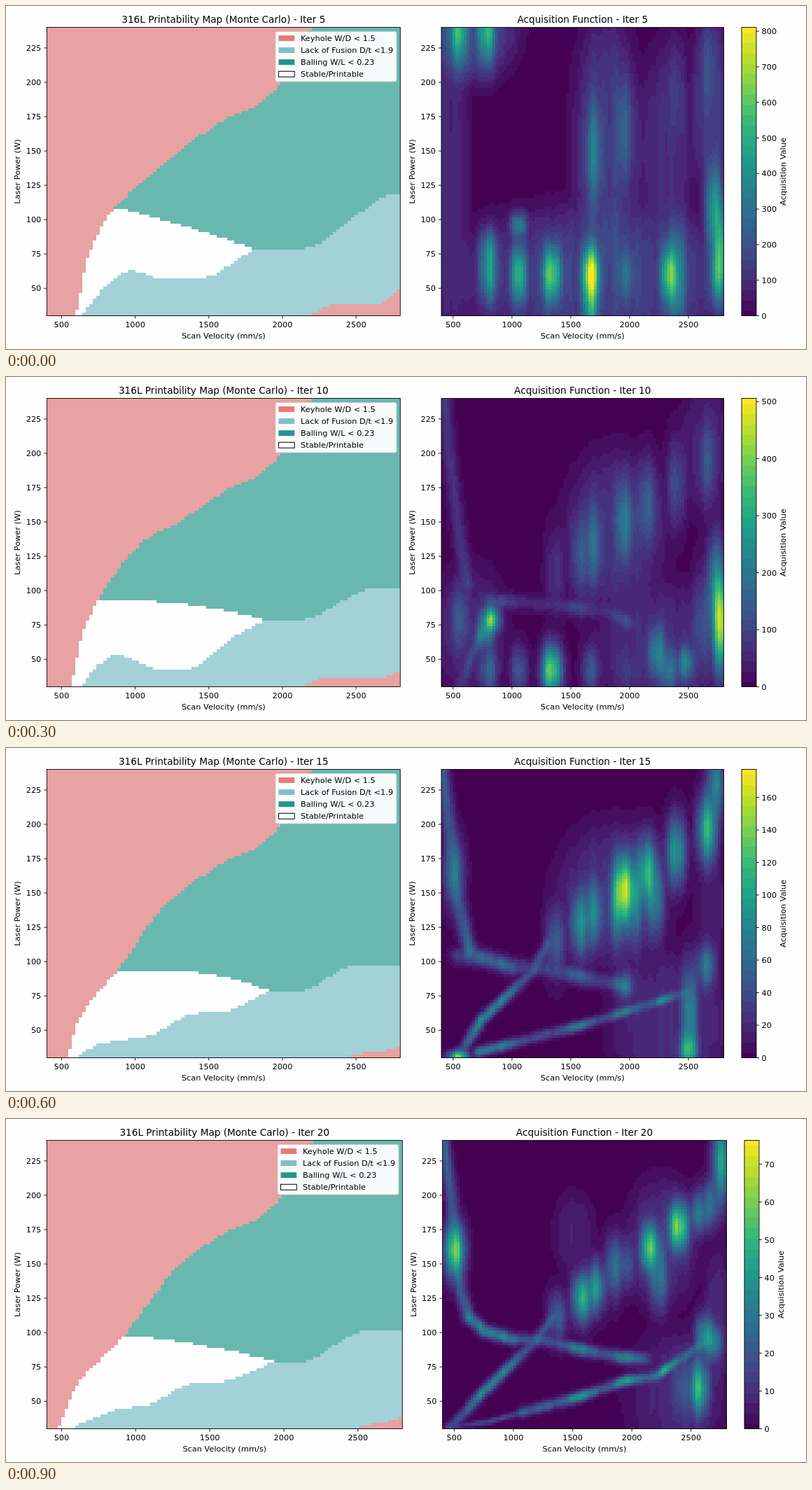
An HTML page with a canvas that plays this animation: 1143 by 490 pixels, repeating every 1200 ms.

```html
<!DOCTYPE html>
<html lang="en">
<head>
<meta charset="utf-8">
<title>Printability map and acquisition function</title>
<style>
html, body { margin: 0; width: 100%; height: 100%; overflow: hidden; background: #fefefe; }
canvas { display: block; }
</style>
</head>
<body>
<canvas id="stage" width="1143" height="490"></canvas>
<script>
const W = 1143, H = 490, TOP = 30.5, BOTTOM = 442.5, CELLS = 100, HOLD = 300, LEVELS = 28;
const V0 = 400, V1 = 2800, P0 = 30, P1 = 240;   // velocity and power ranges
const RED = '#e8a2a2', BLUE = '#a2d1d8', TEAL = '#69b8b0', WHITE = '#fefefe';
const VIRIDIS = ['440154', '482878', '3e4a89', '31688e', '26828e', '1f9e89', '35b779', '6ece58', 'b5de2b', 'fde725']
  .map(h => [0, 2, 4].map(i => parseInt(h.slice(i, i + 2), 16)));
const FONT = '"DejaVu Sans", sans-serif';

// Upper part of the keyhole limit, and the velocities where heat gathers.
const KEYHOLE_TOP = [[1300, 150], [1600, 172], [1880, 187], [2000, 202], [2200, 240]];
const HIGH = [1370, 1580, 1700, 1960, 2155, 2395, 2660];
const LOW = [800, 1060, 1340, 1670, 1970, 2340, 2760];
const BEADS = [740, 930, 1560, 1960, 2280];
const SPOT = 58;   // horizontal spread of a hot spot
const pages = [];

const clamp = t => Math.max(0, Math.min(1, t));
const smooth = t => (t = clamp(t), t * t * (3 - 2 * t));
const bell = d => Math.exp(-d * d / 2);

function viridis(value) {
  const p = Math.round(clamp(value) * LEVELS) / LEVELS * 9, i = Math.min(8, Math.floor(p));
  return `rgb(${VIRIDIS[i].map((c, k) => Math.round(c + (VIRIDIS[i + 1][k] - c) * (p - i)))})`;
}

// Smooth curve through key points that never overshoots them.
function curve(keys) {
  const slope = keys.slice(1).map(([x, y], i) => (y - keys[i][1]) / (x - keys[i][0]));
  const tangent = keys.map((_, i) => {
    const a = slope[i - 1] ?? slope[i], b = slope[i] ?? a;
    return a * b > 0 ? 2 * a * b / (a + b) : 0;
  });
  return v => {
    if (v <= keys[0][0]) return keys[0][1];
    const i = keys.findIndex(k => k[0] > v) - 1;
    if (i < 0) return keys[keys.length - 1][1];
    const [x, y] = keys[i], w = keys[i + 1][0] - x, t = (v - x) / w, s = smooth(t);
    return y + s * (keys[i + 1][1] - y)
      + w * t * (1 - t) * (tangent[i] * (1 - t) - tangent[i + 1] * t);
  };
}

function regionMap({ keyhole, fusion, balling, corner }) {
  const keyholeAt = curve([...keyhole, ...KEYHOLE_TOP]), fusionAt = curve(fusion);
  const { from, height, meet, bend, rise, end } = balling;
  const ballingAt = v => v < meet
    ? 79 + (height - 79) * (1 - clamp((v - from) / (meet - from)) ** bend)
    : 79 + rise * smooth((v - 2120) / (end - 2120));
  const cornerAt = v => 30 + corner.rise * smooth((v - corner.from) / 240) + corner.tail * smooth((v - 2650) / 200);
  return (v, p) => {
    if (p > keyholeAt(v) || p < cornerAt(v)) return RED;
    if (p > ballingAt(v)) return TEAL;
    return v < meet && p > fusionAt(v) ? WHITE : BLUE;
  };
}

// Distance in pixels from a point to a path of key points.
function distance(path, v, p) {
  const kx = .168, ky = 1.96;
  let best = Infinity;
  for (let i = 1; i < path.length; i++) {
    const [a, b] = [path[i - 1], path[i]];
    const dx = (b[0] - a[0]) * kx, dy = (b[1] - a[1]) * ky, x = (v - a[0]) * kx, y = (p - a[1]) * ky;
    const t = clamp((x * dx + y * dy) / (dx * dx + dy * dy));
    best = Math.min(best, Math.hypot(x - t * dx, y - t * dy));
  }
  return best;
}

// Spots are [v, p, height, gain]; hazes are wide flat patches [v, p, width, height, gain].
function heatMap({ high, low = { gains: [] }, spots, hazes, ridges = [] }) {
  const all = [
    ...high.gains.map((g, i) => [HIGH[i], 118 + high.shift + .0635 * (HIGH[i] - HIGH[0]), high.tall, g]),
    ...low.gains.map((g, i) => [LOW[i], low.power, low.tall, g]),
    ...spots
  ];
  return (v, p) => {
    const bead = .8 + .8 * BEADS.reduce((sum, b) => sum + bell((v - b) / 60), 0);
    let sum = 0;
    for (const [sv, sp, tall, gain] of all) sum += (gain * bell((v - sv) / SPOT) * bell((p - sp) / tall)) ** 2;
    for (const [hv, hp, wide, tall, gain] of hazes) {
      const d = ((v - hv) / wide) ** 2 + ((p - hp) / tall) ** 2;
      sum += (gain * bell(d)) ** 2;
    }
    for (const { gain, width, path } of ridges) sum += (gain * bead * bell(distance(path, v, p) / width)) ** 2;
    return Math.sqrt(sum) * (1 + .15 * Math.sin(v / 21) * Math.sin(v / 57));
  };
}

function fillCells(g, x0, width, color) {
  const dx = width / CELLS, dy = (BOTTOM - TOP) / CELLS;
  for (let i = 0; i < CELLS; i++) {
    for (let j = 0; j < CELLS; j++) {
      const x = Math.round(x0 + i * dx), y = Math.round(TOP + j * dy);
      g.fillStyle = color(V0 + (V1 - V0) * (i + .5) / CELLS, P1 - (P1 - P0) * (j + .5) / CELLS);
      g.fillRect(x, y, Math.round(x0 + (i + 1) * dx) - x, Math.round(TOP + (j + 1) * dy) - y);
    }
  }
}

function text(g, str, x, y, align = 'center', size = 11.34) {
  g.font = `${size}px ${FONT}`;
  g.textAlign = align;
  g.fillStyle = '#000';
  g.fillText(str, x, y);
}

function upright(g, str, x, y) {
  g.save();
  g.translate(x, y);
  g.rotate(-Math.PI / 2);
  text(g, str, 0, 0);
  g.restore();
}

function line(g, x1, y1, x2, y2) {
  g.beginPath();
  g.moveTo(x1, y1);
  g.lineTo(x2, y2);
  g.stroke();
}

function axes(g, x0, width, title) {
  g.strokeStyle = '#000';
  g.lineWidth = .9;
  g.strokeRect(x0, TOP, width, BOTTOM - TOP);
  for (let v = 500; v <= 2500; v += 500) {
    const x = x0 + width * (v - V0) / (V1 - V0);
    line(g, x, BOTTOM, x, BOTTOM + 4);
    text(g, v, x, 459);
  }
  for (let p = 50; p <= 225; p += 25) {
    const y = BOTTOM - (BOTTOM - TOP) * (p - P0) / (P1 - P0);
    line(g, x0 - 4, y, x0, y);
    text(g, p, x0 - 8, y + 4.2, 'right');
  }
  text(g, 'Scan Velocity (mm/s)', x0 + width / 2, 475);
  upright(g, 'Laser Power (W)', x0 - 38, 236.5);
  text(g, title, x0 + width / 2, 24, 'center', 13.61);
}

function legend(g, x) {
  g.beginPath();
  g.roundRect(x, 36.5, 173, 71.5, 2.5);
  g.fillStyle = 'rgba(255,255,255,.95)';
  g.fill();
  g.strokeStyle = '#ccc';
  g.stroke();
  [['Keyhole W/D < 1.5', '#e57b7b'], ['Lack of Fusion D/t <1.9', '#7dc0ca'],
   ['Balling W/L < 0.23', '#25948e'], ['Stable/Printable', '#fff']].forEach(([label, color], i) => {
    const y = 42 + i * 17.1;
    g.fillStyle = color;
    g.fillRect(x + 4.5, y, 22.7, 8);
    g.strokeStyle = '#000';
    g.lineWidth = 1;
    if (i === 3) g.strokeRect(x + 4.5, y, 22.7, 8);
    text(g, label, x + 36, y + 8, 'left');
  });
}

function colorbar(g, x, max, step, labelX) {
  const height = BOTTOM - TOP;
  for (let y = Math.round(TOP); y < BOTTOM; y++) {
    g.fillStyle = viridis((BOTTOM - y) / height);
    g.fillRect(x, y, 21, 1);
  }
  g.strokeStyle = '#000';
  g.lineWidth = .9;
  g.strokeRect(x, TOP, 21, height);
  for (let v = 0; v <= max; v += step) {
    const y = BOTTOM - height * v / max;
    line(g, x + 21, y, x + 25, y);
    text(g, v, x + 28.5, y + 4.2, 'left');
  }
  upright(g, 'Acquisition Value', labelX, 236.5);
}

function addPage({ iter, max, step, map, heat, mapW = 505, heatX = 622, heatW = 403.5, barX = 1051, labelX = 1114 }) {
  const page = document.createElement('canvas');
  page.width = W;
  page.height = H;
  const g = page.getContext('2d');
  g.fillStyle = WHITE;
  g.fillRect(0, 0, W, H);
  fillCells(g, 58.3, mapW, regionMap(map));
  axes(g, 58.3, mapW, `316L Printability Map (Monte Carlo) - Iter ${iter}`);
  legend(g, 58.3 + mapW - 178.3);
  const heatAt = heatMap(heat);
  fillCells(g, heatX, heatW, (v, p) => viridis(heatAt(v, p)));
  axes(g, heatX, heatW, `Acquisition Function - Iter ${iter}`);
  colorbar(g, barX, max, step, labelX);
  pages.push(page);
}

addPage({
  iter: 5, max: 811, step: 100,
  map: {
    keyhole: [[595, 30], [690, 76], [860, 108], [1130, 134]],
    fusion: [[637, 30], [790, 50], [970, 63], [1160, 57.5], [1430, 57.5], [1820, 79]],
    balling: { from: 870, height: 108, meet: 1800, bend: 1.2, rise: 40, end: 2800 },
    corner: { from: 2140, rise: 8.5, tail: 13 }
  },
  heat: {
    high: { gains: [0, 0, .38, .3, 0, .17, .2], shift: 10, tall: 30 },
    low: { gains: [.5, .6, .8, .95, .35, .7, .5], power: 60, tall: 16 },
    spots: [[545, 238, 20, .7], [780, 238, 18, .65], [1060, 96, 7, .4], [800, 78, 12, .4],
      [1670, 36, 20, .5], [2400, 58, 30, .5], [2720, 108, 25, .5], [2790, 78, 26, .65]],
    hazes: [[1800, 58, 1080, 44, .18], [650, 240, 330, 34, .2], [1800, 150, 240, 85, .17],
      [490, 130, 130, 130, .1], [2300, 150, 200, 65, .12], [2700, 180, 150, 60, .16]]
  }
});

addPage({
  iter: 10, max: 505.7, step: 100,
  map: {
    keyhole: [[566, 30], [640, 68], [850, 110], [1070, 137]],
    fusion: [[635, 30], [750, 46], [875, 53], [1180, 42.5], [1350, 43], [1640, 64], [1870, 78]],
    balling: { from: 800, height: 93, meet: 1880, bend: 2.2, rise: 22, end: 2620 },
    corner: { from: 2080, rise: 6.5, tail: 5 }
  },
  heat: {
    high: { gains: [.15, .28, .33, .42, .3, .24, .26], shift: -5, tall: 23 },
    low: { gains: [.3, .25, .82, .25, .15, .35, .1], power: 42, tall: 13 },
    spots: [[2790, 77, 24, .95], [2740, 103, 26, .45], [2620, 77, 28, .25], [815, 79, 7, .7],
      [765, 69, 8, .42], [550, 79, 18, .28], [2230, 55, 15, .45], [2470, 47, 10, .42]],
    hazes: [[1880, 143, 360, 50, .14], [650, 70, 260, 42, .1], [2250, 58, 480, 42, .12], [2650, 205, 200, 45, .08]],
    ridges: [{ gain: .18, width: 7, path: [[430, 240], [475, 195], [555, 138], [610, 105]] },
      { gain: .17, width: 6, path: [[555, 30], [675, 57], [810, 79]] },
      { gain: .14, width: 8, path: [[805, 93], [1280, 90], [1800, 85], [2000, 77]] }]
  }
});

addPage({
  iter: 15, max: 177.2, step: 20,
  map: {
    keyhole: [[540, 30], [610, 57], [900, 96], [1110, 130]],
    fusion: [[600, 30], [760, 40], [1110, 47], [1390, 62], [1610, 64], [1910, 79]],
    balling: { from: 900, height: 94, meet: 1910, bend: 3, rise: 18, end: 2500 },
    corner: { from: 2390, rise: 4.5, tail: 4 }
  },
  heat: {
    high: { gains: [.3, .5, .42, .9, .65, .55, .66], shift: -3, tall: 18 },
    spots: [[510, 165, 18, .38], [1900, 145, 22, .5], [2040, 148, 24, .45], [2210, 145, 20, .42],
      [2740, 230, 20, .4], [545, 31, 3, .75], [1965, 83, 9, .3], [2500, 36, 9, .62], [2510, 60, 26, .42],
      [2650, 97, 12, .4]],
    hazes: [[1850, 148, 400, 45, .13], [2350, 55, 430, 45, .12], [2700, 140, 130, 50, .07]],
    ridges: [{ gain: .32, width: 7, path: [[410, 240], [470, 200], [520, 154], [600, 120], [640, 108]] },
      { gain: .22, width: 8, path: [[540, 104], [745, 103], [1000, 96], [1280, 95], [1965, 82]] },
      { gain: .3, width: 5, path: [[535, 30], [745, 58], [1170, 92], [1310, 113]] },
      { gain: .28, width: 5, path: [[715, 34], [935, 39], [1570, 53], [1980, 64], [2470, 77]] }]
  }
});

addPage({
  iter: 20, max: 76.3, step: 10,
  mapW: 508, heatX: 623.5, heatW: 406, barX: 1055, labelX: 1111,
  map: {
    keyhole: [[475, 30], [610, 62], [930, 99], [1166, 133]],
    fusion: [[560, 30], [880, 44], [1090, 48], [1390, 63], [1570, 64], [1960, 80]],
    balling: { from: 920, height: 98, meet: 1960, bend: 1.4, rise: 21.5, end: 2540 },
    corner: { from: 2440, rise: 4.5, tail: 4 }
  },
  heat: {
    high: { gains: [.3, .64, .5, .25, .74, .85, .35], shift: -6, tall: 13 },
    spots: [[505, 160, 14, .8], [2225, 142, 18, .4], [2570, 187, 11, .4], [2765, 225, 22, .55],
      [2620, 98, 11, .52], [2690, 93, 9, .4], [2570, 60, 15, .66], [2420, 60, 19, .27], [1850, 148, 16, .35]],
    hazes: [[1510, 172, 150, 26, .08], [2250, 165, 260, 40, .13], [2380, 55, 350, 40, .1], [2720, 110, 110, 45, .1]],
    ridges: [{ gain: .35, width: 6, path: [[410, 240], [475, 200], [515, 153], [560, 128], [620, 111]] },
      { gain: .3, width: 6, path: [[620, 111], [760, 101], [1000, 95], [1240, 95], [1560, 88], [1910, 82], [2110, 81]] },
      { gain: .3, width: 5, path: [[460, 30], [735, 56], [1190, 94], [1340, 112]] },
      { gain: .15, width: 3, path: [[490, 31], [790, 35], [1080, 42]] },
      { gain: .36, width: 5, path: [[1080, 42], [1550, 53], [1950, 65], [2200, 68], [2600, 92]] }]
  }
});

const stage = document.getElementById('stage').getContext('2d');
const start = performance.now();

function show() {
  const t = Math.max(0, performance.now() - start);
  stage.drawImage(pages[Math.floor(t / HOLD) % pages.length], 0, 0);
  requestAnimationFrame(show);
}
show();
</script>
</body>
</html>
```
